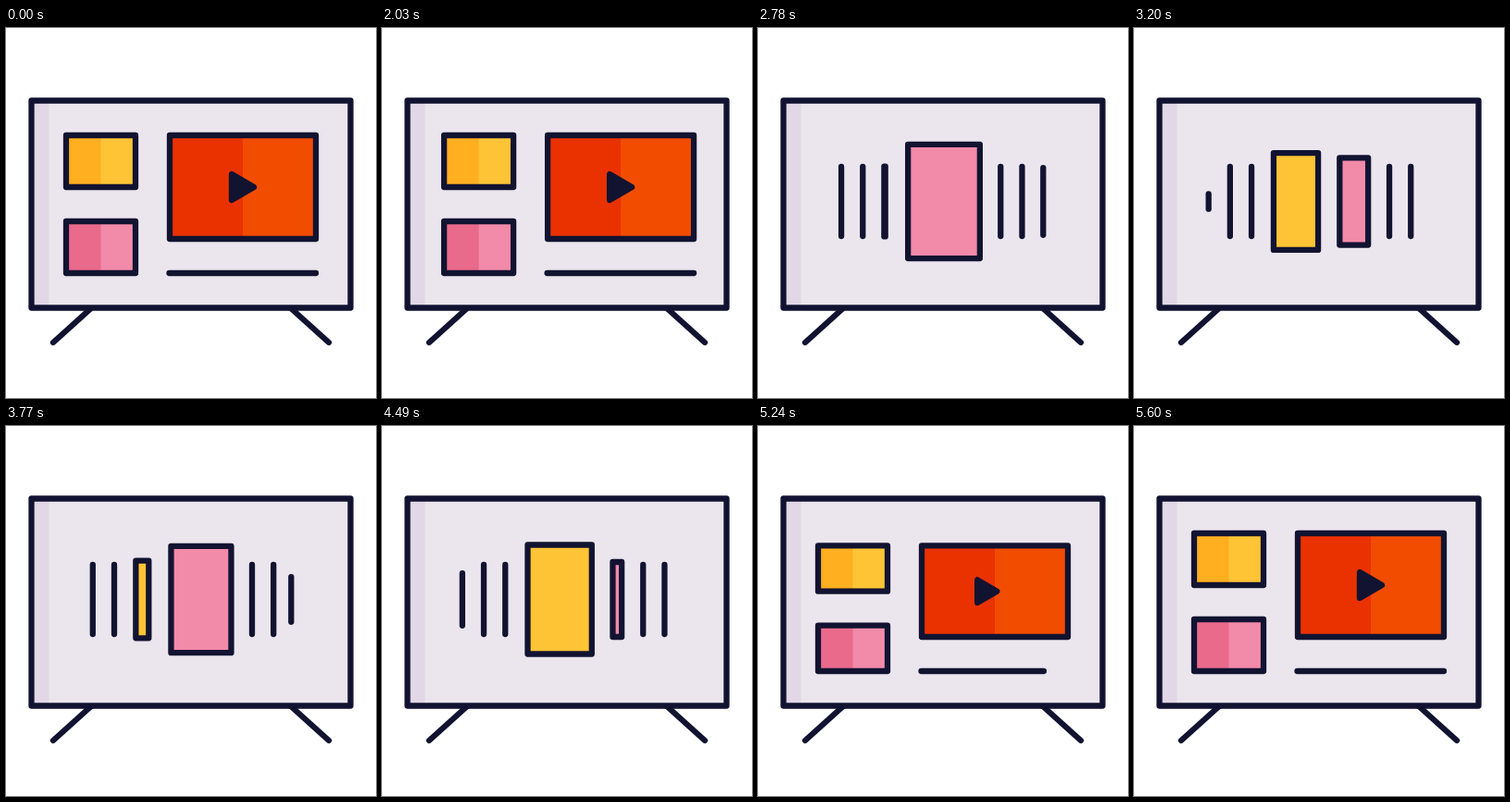
An HTML page with a canvas that plays this animation: 400x400 px, repeating every 5630 ms.

```html
<!DOCTYPE html>
<html lang="en">
<head>
<meta charset="utf-8">
<title>TV gallery</title>
<style>
  html, body { margin: 0; width: 100%; height: 100%; overflow: hidden; background: #fff; }
  canvas { display: block; width: 100vmin; height: 100vmin; }
</style>
</head>
<body>
<canvas></canvas>
<script>
const LOOP = 5630, TICK = 30;
const INK = '#121331', SCREEN = '#ebe6ed', SHADE = '#e1d7e6';
const YELLOW = ['#ffaf20', '#ffc435'], PINK = ['#ea6a8c', '#f28aaa'], RED = ['#ea3200', '#f24c00'];
const MIDDLE = 187.5, GAP = 23.2, BAR = 75, CARD_W = 79, CARD_H = 124;
// Start times of the carousel steps; they go forward and back in turn.
const STEPS = [2535, 3048, 3576, 4283, 4635], STEP_TIME = 265;

const canvas = document.querySelector('canvas');
const ctx = canvas.getContext('2d');

const mix = (a, b, p) => a + (b - a) * p;
const span = (t, start, length) => Math.min(1, Math.max(0, (t - start) / length));
const smooth = p => p * p * (3 - 2 * p);

// Same curve as cubic-bezier(.33, 0, 0, 1): quick start, long settling.
function settle(x) {
  if (x <= 0 || x >= 1) return x;
  let low = 0, high = 1;
  for (let i = 0; i < 20; i++) {
    const s = (low + high) / 2;
    if (0.99 * (1 - s) ** 2 * s + s ** 3 < x) low = s; else high = s;
  }
  return smooth(low);
}

function line(x1, y1, x2, y2) {
  ctx.beginPath();
  ctx.moveTo(x1, y1);
  ctx.lineTo(x2, y2);
  ctx.stroke();
}

function box(left, top, right, bottom, [first, second = first]) {
  const center = (left + right) / 2;
  ctx.fillStyle = first;
  ctx.fillRect(left, top, right - left, bottom - top);
  if (second !== first) {
    ctx.fillStyle = second;
    ctx.fillRect(center, top, right - center, bottom - top);
  }
  ctx.beginPath();
  ctx.moveTo(left, top);
  ctx.lineTo(right, top);
  ctx.lineTo(right, bottom);
  ctx.lineTo(left, bottom);
  ctx.closePath();
  ctx.stroke();
}

function drawHome(grow, underline) {
  box(65, 228 - 112 * grow, 140, 228 - 56 * grow, YELLOW);
  box(65, 265 - 56 * grow, 140, 265, PINK);
  box(177, 228 - 112 * grow, 335, 228, RED);

  const middle = 228 - 56 * grow, left = mix(187, 244, grow);
  ctx.fillStyle = INK;
  ctx.beginPath();
  ctx.moveTo(left, middle - 14 * grow);
  ctx.lineTo(left, middle + 14 * grow);
  ctx.lineTo(mix(187, 268, grow), middle);
  ctx.closePath();
  ctx.fill();
  ctx.stroke();

  if (underline > 0) line(176.5, 265, mix(176.5, 335, underline), 265);
}

function drawGallery(step, grow) {
  const bar = (x, size) => {
    const half = BAR / 2 * size * grow;
    if (half > 0) line(x, MIDDLE - half, x, MIDDLE + half);
  };
  const card = (x, open, color) => {
    const w = CARD_W / 2 * open, h = mix(BAR, CARD_H, open) / 2 * grow;
    box(x - w, MIDDLE - h, x + w, MIDDLE + h, [color]);
  };
  const shift = GAP * step;
  bar(89.7 - shift, Math.max(0, 1 - 2 * step));
  for (const x of [89.7 + GAP, 89.7 + 2 * GAP, 261.9 + GAP, 261.9 + 2 * GAP]) bar(x - shift, 1);
  bar(308.3, Math.max(0, 2 * step - 1));
  card(mix(200, 136, step), 1 - step, YELLOW[1]);
  card(mix(261.9, 200, step), step, PINK[1]);
}

function drawScreen(t) {
  const slide = settle(span(t, 2012, 430));
  const open = settle(span(t, 2154, 420));
  const back = settle(span(t, 4868, 718));
  const step = STEPS.reduce((sum, start, i) =>
    sum + (i % 2 ? -1 : 1) * smooth(span(t, start, STEP_TIME)), 0);

  if (open > 0 && back < 1) {
    ctx.save();
    ctx.translate(0, -423 * back);
    drawGallery(step, open);
    ctx.restore();
  }
  if (back > 0) {
    drawHome(back, settle(span(t, 4942, 650)));
  } else if (slide < 1) {
    ctx.save();
    ctx.translate(335 * slide, 0);
    drawHome(1, 1);
    ctx.restore();
  }
}

function draw(t) {
  ctx.fillStyle = '#fff';
  ctx.fillRect(0, 0, 400, 400);
  ctx.strokeStyle = INK;
  ctx.lineWidth = 6.3;
  ctx.lineCap = ctx.lineJoin = 'round';

  line(92, 303, 51, 340);
  line(308, 303, 349, 340);
  ctx.fillStyle = SCREEN;
  ctx.fillRect(27.5, 78.5, 345, 224);
  ctx.fillStyle = SHADE;
  ctx.fillRect(27.5, 78.5, 19, 224);

  ctx.save();
  ctx.beginPath();
  ctx.rect(27.5, 78.5, 345, 224);
  ctx.clip();
  drawScreen(t);
  ctx.restore();

  ctx.strokeRect(27.5, 78.5, 345, 224);
}

function frame(now) {
  const size = Math.round(Math.min(innerWidth, innerHeight) * devicePixelRatio);
  if (canvas.width !== size) canvas.width = canvas.height = size;
  ctx.setTransform(size / 400, 0, 0, size / 400, 0, 0);
  const time = now % LOOP;
  draw(Math.floor((time - 20) / TICK) * TICK + 20);
  requestAnimationFrame(frame);
}
frame(performance.now());
</script>
</body>
</html>
```
